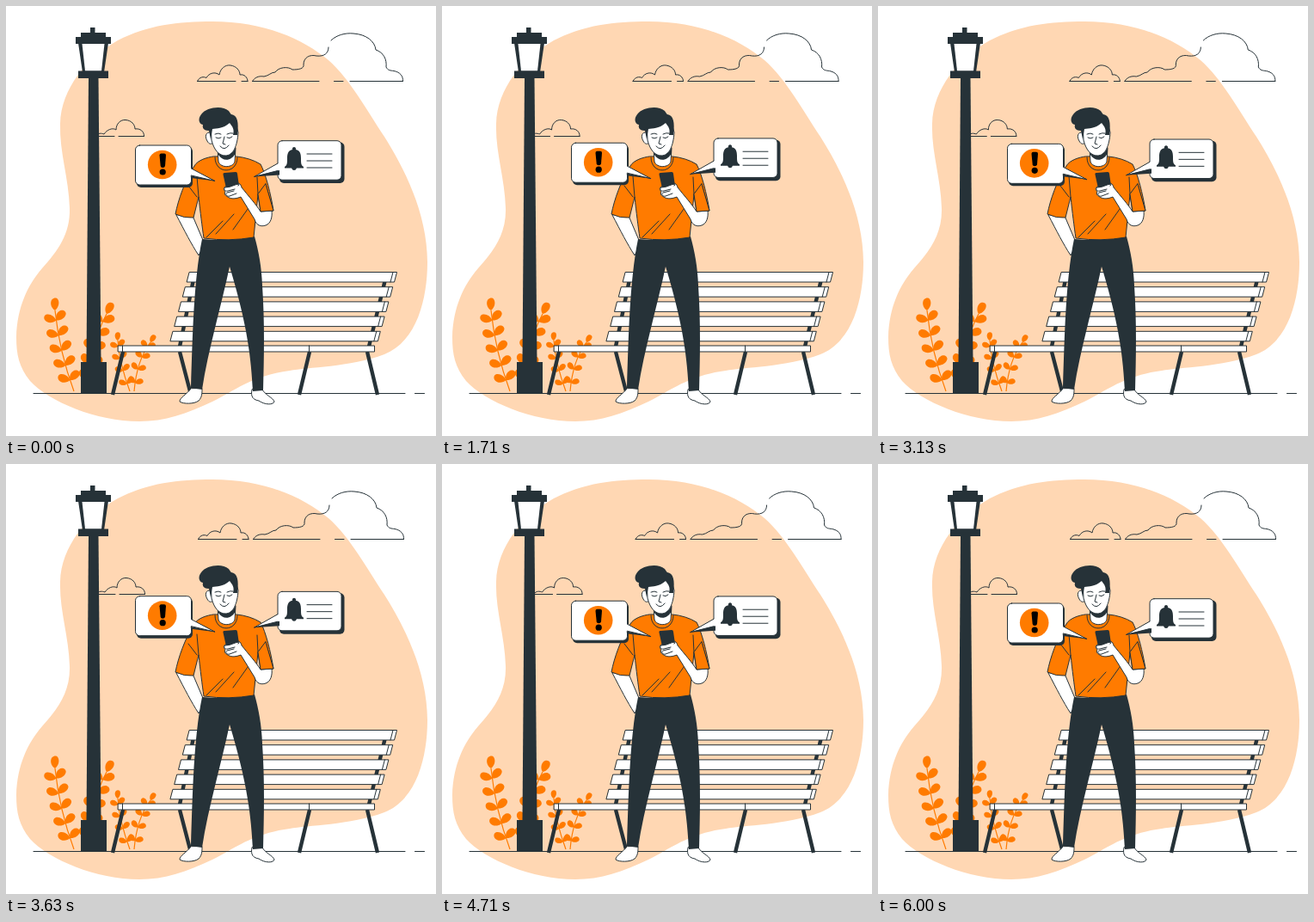
An HTML page that plays this animation: 500x500 px, repeating every 6040 ms.

```html
<!DOCTYPE html>
<html lang="en">
<head>
<meta charset="utf-8">
<title>Notifications in the park</title>
<style>
  html, body { margin: 0; width: 100%; height: 100%; overflow: hidden; background: #fff; }
  svg { display: block; width: 100%; height: 100%; }
  .ink { fill: #263238; }
  .orange { fill: #ff7b00; }
  .white { fill: #fff; }
  .line { fill: none; }
  .line, .edge { stroke: #263238; stroke-width: 1; stroke-linecap: round; stroke-linejoin: round; }
  .bar { fill: none; stroke: #263238; stroke-width: 4.4; }
  .stem { fill: none; stroke: #ff7b00; stroke-width: 1.2; }
</style>
</head>
<body>
<svg viewBox="0 0 500 500">
  <path fill="#ffd7b3" d="M240 18C300 18 345 38 375 63C400 85 420 122 440 152C462 187 490 240 490 298C490 340 478 390 440 405C400 420 350 420 330 424C285 430 265 448 240 460C210 474 185 483 155 483C105 483 50 460 28 436C15 420 12 405 12 385C13 350 25 325 42 305C60 285 75 265 74 235C73 200 62 170 63 137C64 95 95 60 130 40C165 22 200 18 240 18Z"/>

  <g id="clouds" class="line">
    <path d="M286.500 87.500C289 83 294 81 300 82C306 81 308 77 313 77C317 71 328 70 333 74C340 74 347 73 346 68C346 60 353 56 361 58C370 59 375 55 375 48"/>
    <path d="M378 40C384 34 394 31 404 32C419 33 429 41 430 51C439 54 443 62 442 71C444 75 447 75 451 75.500C458 77 462 81 461.500 87.500"/>
    <path d="M286.500 87.500H364M381.500 87.500H392M400 87.500H461.500"/>
    <path d="M222.500 87.500C225 82 230 82 233 83.500C236 78 243 76 248 80C249 73 255 68 261 69C268 70 272 75 272 80C277 79 281 83 281 87.500M222.500 87.500H267M274 87.500H281"/>
    <path d="M104 151.500C107 147 111 148 114 149C117 144 124 141 128 144C128 137 133 132 139 132.500C146 133 150 138 150 143C156 142 161 146 160.500 151.500M104 151.500H126M131 151.500H160.500"/>
  </g>

  <g id="plants"></g>

  <path class="line" d="M32 450.500H464M475.500 450.500H486.500"/>

  <g class="ink">
    <path d="M98 25H103.500V31H116V36H122V44H81V36H87V31H98Z"/>
    <path d="M84 43H119L114 77H89Z"/>
    <path class="white" d="M88.500 44H114.500L111 75.500H92Z"/>
    <path d="M84 75.500H119V84H84Z"/>
    <path d="M96 84H107.500L110.500 414H93.500Z"/>
    <path d="M87 414H117V450.500H87Z"/>
  </g>

  <g id="bench">
    <path class="bar" d="M218 318L202 396M441 318L422 396M136 402L124 452M202 402L214 448M353 402L341 452M420 402L432 452"/>
  </g>

  <g id="man">
    <path class="white edge" d="M198 243C208 262 215 276 224 290L231 277L217 244Z"/>
    <path class="white edge" d="M215 445C210 452 202 455 202 460C206 463 219 463 224 459C228 455 228 450 228 445Z"/>
    <path class="white edge" d="M286 446C284 455 288 458 294 459C301 464 311 464 312 460C310 455 302 453 298 446Z"/>
    <path class="ink" d="M228 271Q259 274 289 268C294 286 297 303 298 325C301 370 300 410 299 447L287 448C285 410 281 372 260 303C250 350 235 400 228 446L215 444C217 385 218 320 228 271Z"/>
    <path class="orange edge" d="M241 175C234 176 223 179 219 186C208 203 200 226 197 242Q207 247 218 246L224 222C226 240 228 256 230 270Q259 274 288 269L293 219L296 239L311 238C308 219 302 195 296 184C288 179 278 176 268 175Z"/>
    <path class="line" d="M224 222L222 198M293 219L292 199M212 209L222 222M302 207L310 236M233 269L252 250M244 265L265 242M264 260L284 232M243 176C243 196 269 196 269 176"/>
    <path class="white edge" d="M246 165L247 181C250 189 264 188 266 181L267 165Z"/>
    <path class="ink" d="M246 167C250 175 262 177 267 164V171C262 181 252 181 247 173Z"/>
    <path class="white edge" d="M238 147C232 146 231 152 234 157C236 161 239 161 241 159Z"/>
    <path class="white edge" d="M238 135L239 156C242 168 248 174 255 174C264 174 269 163 270 147L266 132Z"/>
    <path class="ink" d="M238 155L236 145C230 145 228 142 229 138C224 137 223 131 227 126C233 118 251 115 259 122C261 125 261 125 262 126C269 127 271 135 269 150H264C266 143 263 140 260 136C252 143 245 142 240 143Z"/>
    <path class="line" d="M243 149Q247 147 250 149M257 149Q261 147 264 148M244 153Q247 155 250 153M257 153Q260 155 263 152M254 152L252 160L255 161M249 163Q254 169 259 162"/>

    <path class="white edge" d="M309 238L296 239C291 231 282 221 274 211C273 206 269 205 266 206L255 210C252 212 254 215 255 216C253 219 256 221 258 222C262 225 268 224 273 222L289 248C291 255 296 257 302 255C308 253 310 245 309 238Z"/>
    <path class="ink" d="M252.500 196Q252 194 254 194L267 193Q269 193 269 195L271 209L256 212Z"/>
    <path class="white edge" d="M271 207C266 207 262 211 255 211C252 213 255 216 258 215L266 213M265 215L257 217C254 219 257 222 260 221L268 218"/>
    <path class="orange edge" d="M293 219L296 239L311 238L302 207Z"/>
  </g>

  <g id="bubbles">
    <rect class="ink" x="152" y="164" width="65" height="47" rx="5"/>
    <rect class="white edge" x="150.500" y="162" width="65" height="46" rx="5"/>
    <path class="ink" d="M214 190L243.500 203.500L215 200Z"/>
    <path class="white" d="M214 188L242 203L214 197Z"/>
    <path class="line" d="M215.500 189L243 203.500L215.500 197"/>
    <circle class="orange" cx="181.700" cy="184.500" r="16.800"/>
    <path d="M178.500 173.500Q178.500 171.500 180.500 171.500H184Q186 171.500 186 173.500L185 186Q184.500 188 182.200 188Q180 188 179.700 186Z"/>
    <circle cx="182.200" cy="193" r="3.600"/>

    <rect class="ink" x="318" y="158.500" width="75.500" height="47.500" rx="5"/>
    <rect class="white edge" x="316" y="156.700" width="74" height="45.500" rx="5"/>
    <path class="ink" d="M318 186L288 198.500L318 196.500Z"/>
    <path class="white" d="M318 182L289 198L318 191Z"/>
    <path class="line" d="M316 183L288.500 198.500L316 191.500"/>
    <path class="ink" d="M333 167C332 163 338 163 337 167C342 168 343 172 343 177C343 183 343 185 346 187V188.500H324V187C327 185 327 183 327 177C327 172 328 168 333 167ZM332 188.500H338Q337 191 335 191Q333 191 332 188.500Z"/>
    <path class="line" d="M350 172H379M350 180H379M350 188H379"/>
  </g>
</svg>

<script>
const NS = 'http://www.w3.org/2000/svg';
const byId = id => document.getElementById(id);

function addPath(parent, cls, d, transform) {
  const path = document.createElementNS(NS, 'path');
  path.setAttribute('class', cls);
  path.setAttribute('d', d);
  if (transform) path.setAttribute('transform', transform);
  parent.append(path);
}

// Stem is a quadratic curve; leaves sit in pairs along it, plus one at the tip.
function plant(root, bend, tip, pairs, size) {
  const group = byId('plants');
  const leaf = (x, y, angle) => addPath(group, 'orange',
    'M0 0C3 -5 10 -6 13 -3C15 -1 15 2 13 3.500C9 6 3 4 0 0Z',
    `translate(${x} ${y}) rotate(${angle}) scale(${size})`);
  const mix = (t, i) => (1 - t) ** 2 * root[i] + 2 * t * (1 - t) * bend[i] + t * t * tip[i];
  const lean = Math.atan2(tip[1] - root[1], tip[0] - root[0]) * 180 / Math.PI;
  addPath(group, 'stem', `M${root}Q${bend} ${tip}`);
  leaf(tip[0], tip[1], lean + 12);
  for (let k = 0; k < pairs; k++) {
    const t = 0.14 + 0.74 * k / (pairs - 1);
    const x = mix(t, 0), y = mix(t, 1);
    leaf(x, y, lean - 62);
    leaf(x, y, lean + 55);
  }
}
plant([79, 448], [62, 402], [57, 354], 5, 1);
plant([96, 448], [97, 395], [117, 358], 5, 1);
plant([144, 448], [132, 416], [130, 389], 4, 0.68);
plant([149, 448], [152, 412], [168, 391], 4, 0.68);

const bench = byId('bench');
for (let i = 0; i < 5; i++) {
  const x = 213.5 - 4.8 * i, y = 309.5 + 17.2 * i;
  addPath(bench, 'white edge', `M${x} ${y}h241l-3 11.500h-241Z`);
  addPath(bench, 'line', `M${x + 236.5} ${y}l-3 11.500`);
}
addPath(bench, 'white edge', 'M130.500 395H428.500V402H130.500Z');
addPath(bench, 'line', 'M352.500 395V402M135.500 395V402');

const LOOP = 6040, FPS = 24;
const SHAKE = [0, -1, 2, -4, 4, -4, 4, -4, 2, -1, 0];
const SHAKE_DELAY = 1000, SHAKE_STEP = 600, FLOAT_HALF = 750;

function shakeX(t) {
  const s = Math.max(0, t - SHAKE_DELAY) / SHAKE_STEP;
  const i = Math.floor(s);
  return SHAKE[i] + (SHAKE[i + 1] - SHAKE[i]) * (s - i);
}

function floatY(t) {
  const s = t / FLOAT_HALF % 2;
  return -10 * (s < 1 ? s : 2 - s);
}

const clouds = byId('clouds'), bubbles = byId('bubbles');
const start = performance.now();

function draw() {
  const elapsed = (performance.now() - start) % LOOP;
  const t = Math.floor(elapsed * FPS / 1000 + 0.05) * 1000 / FPS;
  clouds.setAttribute('transform', `translate(${shakeX(t)} 0)`);
  bubbles.setAttribute('transform', `translate(0 ${floatY(t)})`);
  requestAnimationFrame(draw);
}
draw();
</script>
</body>
</html>
```
